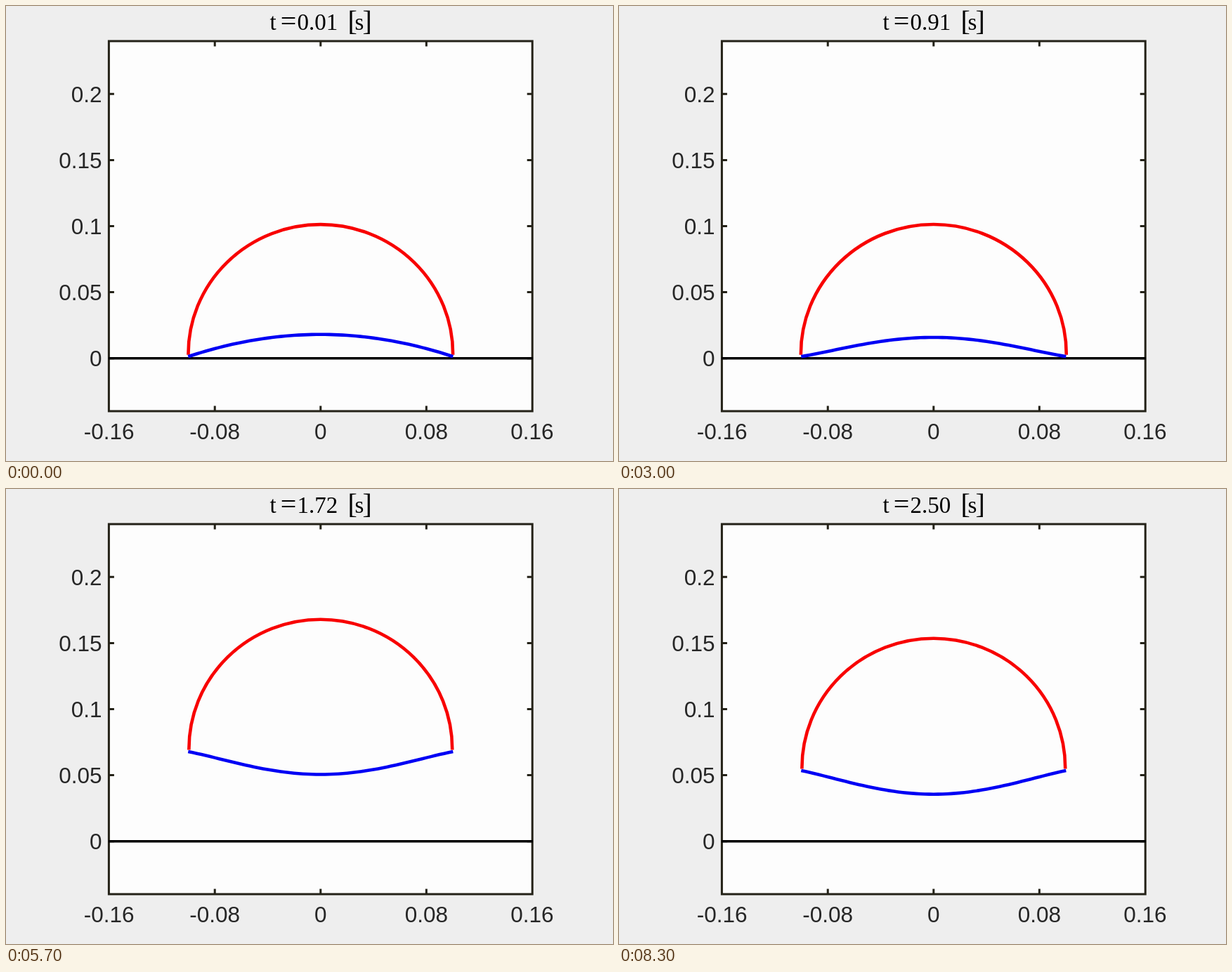
Write an HTML page that moves like this. It is 864 px wide and 648 px high and loops after 8.4 s.

```html
<!DOCTYPE html>
<html lang="en">
<head>
<meta charset="utf-8">
<title>Jumping shell</title>
<style>
  html, body { margin: 0; width: 100%; height: 100%; overflow: hidden; background: #eee; }
  svg { display: block; width: 864px; height: 648px; }
  .label { font: 31.5px "Liberation Sans", Arial, sans-serif; fill: #262626; }
  .title { font: 33px "Liberation Serif", "Times New Roman", serif; fill: #000; }
  .big { font-size: 40px; }
  .curve { fill: none; stroke-width: 4.6; stroke-linejoin: round; }
</style>
</head>
<body>
<svg viewBox="0 0 864 648">
  <rect width="864" height="648" fill="#eee"/>
  <rect x="146.4" y="50" width="602.8" height="527" fill="#fdfdfd"/>
  <g id="axes"></g>
  <path d="M146 501.7H750" stroke="#000" stroke-width="3.4"/>
  <path id="dome" class="curve" stroke="#f80000"/>
  <path id="base" class="curve" stroke="#0000f4"/>
  <g class="title">
    <text x="375.5" y="33.5">t</text>
    <text class="big" x="402" y="34.5" text-anchor="middle">=</text>
    <text id="clock" x="414.5" y="33.5"></text>
    <text class="big" x="486.5" y="34.5">[</text>
    <text x="496.5" y="33.5">s</text>
    <text class="big" x="507.5" y="34.5">]</text>
  </g>
</svg>
<script>
const $ = id => document.getElementById(id);
const SCALE = 1882, CX = 447.8, GROUND = 501.7, G = 9.81;
const toX = v => CX + v * SCALE;
const toY = v => GROUND - v * SCALE;

function drawAxes() {
  let ticks = '', labels = '';
  for (const v of [0, 0.05, 0.1, 0.15, 0.2]) {
    const y = toY(v);
    ticks += `M146.4 ${y}h7.5M749.2 ${y}h-7.5`;
    labels += `<text class="label" x="136.5" y="${y + 11.3}" text-anchor="end">${v}</text>`;
  }
  for (const v of [-0.16, -0.08, 0, 0.08, 0.16]) {
    const x = toX(v);
    if (Math.abs(v) < 0.16) ticks += `M${x} 50v7.5M${x} 577v-7.5`;
    labels += `<text class="label" x="${x}" y="616.5" text-anchor="middle">${v}</text>`;
  }
  $('axes').innerHTML =
    `<path d="M146.4 50H749.2V577H146.4Z${ticks}" fill="none" stroke="#242218" stroke-width="3"/>` + labels;
}

// Snap-through, then ballistic hops separated by short elastic contacts.
const SNAP = 1.345, LIFTOFF = 1.3627, CONTACT = 0.02, REST = 0.0013;
const SPEEDS = [1.445, 1.394, 1.332, 1.27];

// rim: height of the edge; bulge: centre relative to the edge; shape: flattening near the edge
function pose(t) {
  if (t < LIFTOFF) {
    const creep = 0.0115 + 0.0045 * Math.sqrt(Math.max(0, 1.36 - t));
    const shape = Math.min(0.5, 175 * (0.0168 - creep));
    if (t < SNAP) return { rim: REST, bulge: creep, shape, rx: 188.3 + 1.6 * shape };
    const p = (t - SNAP) / (LIFTOFF - SNAP);
    const bulge = creep + (-0.0165 - creep) * p * p * (3 - 2 * p);
    return { rim: REST + Math.max(0, -bulge), bulge, shape: 0.45, rx: 188.3 };
  }
  const sag = 0.0181 - 0.0016 * Math.exp(-(t - 1.4) / 0.45);
  let start = LIFTOFF, height = 0, squash = 0;
  for (const v of SPEEDS) {
    const air = 2 * v / G, s = t - start;
    if (s < air) {
      height = v * s - G * s * s / 2;
      break;
    }
    if (s < air + CONTACT) {
      squash = v * CONTACT / Math.PI * Math.sin(Math.PI * (s - air) / CONTACT);
      break;
    }
    start += air + CONTACT;
  }
  const bulge = squash - sag;
  return { rim: Math.max(height, REST) - bulge, bulge, shape: 0.4, rx: 187.4 };
}

function draw(t) {
  const { rim, bulge, shape, rx } = pose(t);
  const y = toY(rim), ry = 188.2, low = y - 2.5;
  $('dome').setAttribute('d',
    `M${CX - rx} ${low}V${y - 4}A${rx} ${ry - 4} 0 0 1 ${CX + rx} ${y - 4}V${low}`);
  let d = '';
  for (let i = 0; i <= 60; i++) {
    const u = i / 30 - 1, q = 1 - u * u;
    const lift = bulge * SCALE * q * (1 - shape + shape * q);
    d += `${i ? 'L' : 'M'}${(CX + 188.5 * u).toFixed(2)} ${(y - lift).toFixed(2)}`;
  }
  $('base').setAttribute('d', d);
  $('clock').textContent = t.toFixed(2);
}

const STEP = 100, COUNT = 84;
const begin = performance.now();
function tick(now) {
  const n = Math.floor(Math.max(0, now - begin) / STEP) % COUNT;
  draw(0.01 + 0.03 * n);
  requestAnimationFrame(tick);
}
drawAxes();
tick(begin);
</script>
</body>
</html>
```
